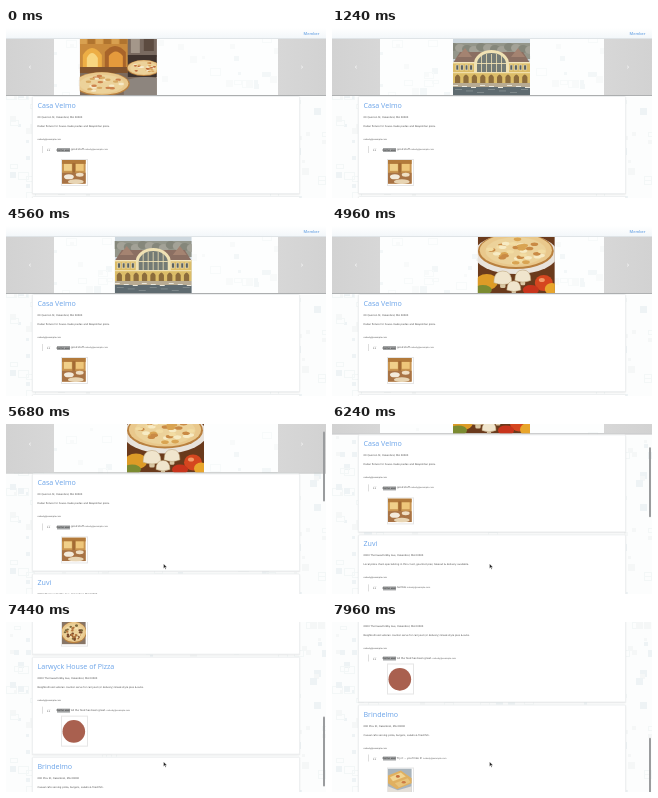
Write an HTML page with a canvas that moves like this. It is 320 px wide and 170 px high and loops after 8000 ms.

```html
<!DOCTYPE html>
<html lang="en">
<head>
<meta charset="utf-8">
<title>Pizza places</title>
<style>
html, body { margin: 0; width: 100%; height: 100%; overflow: hidden; background: #fcfdfd; }
#stage { position: relative; width: 320px; height: 170px; overflow: hidden; font-family: "DejaVu Sans", sans-serif; color: #444; }
#stage * { box-sizing: border-box; }
#backdrop, #page, #cursor, #bar { position: absolute; left: 0; top: 0; }
#page { width: 320px; height: 470px; }
header { position: absolute; width: 320px; height: 11px; background: linear-gradient(#fff, #f3f7fa); border-bottom: 1px solid #dfe4e7; }
header span { position: absolute; right: 6.5px; top: 2.5px; font: 600 3.9px/6px "Open Sans", sans-serif; color: #6ea6e4; }
#carousel { position: absolute; top: 11px; width: 320px; height: 57px; overflow: hidden; background: rgba(255,255,255,.3); border-bottom: 1.5px solid #aeb0b1; }
.slide { position: absolute; left: 121px; top: 0; width: 77px; height: 56px; }
.control { position: absolute; top: 0; width: 48px; height: 56px; background: linear-gradient(90deg, #d2d2d2, #d7d7d7); color: #fff; font: 8px/53px "Open Sans", sans-serif; text-align: center; }
.control.next { right: 0; background: linear-gradient(270deg, #d2d2d2, #d7d7d7); }
.card { position: absolute; left: 26px; width: 268px; height: 98px; background: #fff; border: .5px solid #eef0f1; border-radius: 1.5px; box-shadow: 0 .5px 1.5px rgba(0,0,0,.1); }
.card > * { position: absolute; margin: 0; white-space: nowrap; }
.card h2 { left: 4.5px; top: 3px; font: 500 7.1px/11px "Open Sans", sans-serif; color: #6aa3e8; }
.card p { left: 4.5px; font-size: 2.45px; line-height: 4px; }
.card .mail { font-size: 2.05px; }
.quote { left: 9px; top: 49px; height: 7px; border-left: 1px solid #ddd; padding-left: 13.5px; font-size: 2.5px; line-height: 6px; }
.quote::before { content: "“"; position: absolute; left: 3.5px; top: .5px; font: 9px/9px "Noto Serif", serif; color: #b5b5b5; }
.quote b { font-weight: 400; background: #a2a4a5; padding: .5px 0; color: #222; }
.quote small { font-size: 2.05px; color: #555; }
.thumb { left: 27.5px; top: 61.5px; width: 27px; height: 27px; padding: .7px; background: #fff; border: .5px solid #e6e6e6; }
.thumb.tall { top: 58px; height: 31px; }
.thumb svg { display: block; width: 100%; height: 100%; }
#bar { left: 317px; width: 2.4px; height: 70px; border-radius: 2px; background: #9a9c9e; }
</style>
</head>
<body>
<div id="stage">
  <canvas id="backdrop" width="320" height="170"></canvas>
  <div id="page">
    <header><span>Member</span></header>
    <div id="carousel">
      <svg class="slide" viewBox="0 0 77 56" id="oven"></svg>
      <svg class="slide" viewBox="0 0 77 56" id="boathouse"></svg>
      <svg class="slide" viewBox="0 0 77 56" id="mushroom"></svg>
      <div class="control">‹</div>
      <div class="control next">›</div>
    </div>
  </div>
  <div id="bar"></div>
  <svg id="cursor" width="5" height="7" viewBox="0 0 5 7"><path d="M.5 .3V5L1.6 4 2.4 5.8 3.2 5.4 2.4 3.8H4Z" fill="#222" stroke="#fff" stroke-width=".4"/></svg>
</div>
<script>
const $ = id => document.getElementById(id);
const LOOP = 8000;

const seeded = seed => () => (seed = (seed * 16807) % 2147483647) / 2147483647;
const rect = (x, y, w, h, fill, extra = '') => `<rect x="${x}" y="${y}" width="${w}" height="${h}" fill="${fill}" ${extra}/>`;
const oval = (x, y, rx, ry, fill) => `<ellipse cx="${x}" cy="${y}" rx="${rx}" ry="${ry}" fill="${fill}"/>`;
const path = (d, fill, extra = '') => `<path d="${d}" fill="${fill}" ${extra}/>`;
const repeat = (n, draw) => Array.from({ length: n }, (_, i) => draw(i)).join('');

function pizza(x, y, rx, ry, seed, colors, count = 24) {
  const rnd = seeded(seed);
  return oval(x, y, rx, ry, '#b9803f') + oval(x, y - ry * .04, rx * .95, ry * .93, '#e9c88c') +
    oval(x, y, rx * .8, ry * .77, '#ecd29a') +
    repeat(count, i => {
      const a = rnd() * 6.28, r = Math.sqrt(rnd()) * .72;
      return oval(x + Math.cos(a) * r * rx, y + Math.sin(a) * r * ry, rx * .1, ry * .1, colors[i % colors.length]);
    });
}

function ovenArt() {
  return rect(0, 0, 77, 56, '#7d6a5c') + rect(0, 0, 48, 32, '#c98a3c') +
    repeat(6, i => rect(i * 8, 0, 7, 5, i % 2 ? '#b0742f' : '#d8a050')) +
    path('M3 30V16Q12 2 22 16V30Z', '#edae45') + path('M7 30V19Q12 9 18 19V30Z', '#f8d680') +
    path('M25 30V13Q35 1 46 13V30Z', '#a8642a') + path('M29 30V17Q36 8 43 17V30Z', '#e59a3c') +
    rect(48, 0, 29, 18, '#796a60') + rect(51, 0, 9, 14, '#a4978a') + rect(64, 0, 10, 12, '#5c4b40') +
    rect(48, 16, 29, 22, '#40342f') + rect(0, 28, 48, 6, '#80532e') +
    pizza(64, 29, 17, 8, 12, ['#f8efd4', '#d8a35c', '#bf6a3c']) +
    path('M44 56V42Q60 36 77 39V56Z', '#8d857e') +
    pizza(22, 45, 28, 12, 7, ['#f6e9c8', '#d8aa64', '#cc814b']);
}

function boathouseArt() {
  const windows = (x, y, n, step) => repeat(n, i => rect(x + i * step, y, 2.6, 5, '#5d6360', 'stroke="#f5ead0" stroke-width=".5"'));
  return rect(0, 0, 77, 56, '#cdd7de') + rect(0, 4, 77, 16, '#94968a') +
    repeat(12, i => oval(i * 7, 8 + (i * 5) % 4, 5, 4, i % 2 ? '#a3a297' : '#85877b')) +
    path('M0 24L7 13H70L77 24Z', '#8b6f62') + path('M5 18L12 9 19 18ZM58 18L65 9 72 18Z', '#a48371') +
    rect(0, 23, 77, 21, '#dcbd68') + rect(0, 23, 77, 1.4, '#f4e7bd') + rect(0, 33, 77, 1.2, '#f1dfaa') +
    path('M21 34V25A17.5 14 0 0 1 56 25V34Z', '#f0e2b4') + path('M24 33V25A14.5 11 0 0 1 53 25V33Z', '#747b75') +
    repeat(5, i => rect(28 + i * 5, 15, .8, 18, '#f0e2b4')) + rect(24, 24, 29, .9, '#f0e2b4') +
    windows(3, 26, 4, 4.6) + windows(57, 26, 4, 4.6) +
    repeat(9, i => path(`M${2 + i * 8.4} 44V38Q${4.6 + i * 8.4} 33 ${7.2 + i * 8.4} 38V44Z`, '#8c6c3c')) +
    rect(0, 44, 77, 4, '#b8ab93') + rect(0, 48, 77, 8, '#5f6b70') +
    repeat(9, i => rect(i * 9, 46 + i % 3, 5, 1, '#ece8dc')) +
    repeat(7, i => rect(i * 11 + 2, 50 + (i % 3) * 1.6, 7, .7, '#8c9697'));
}

function mushroomArt() {
  const mushroom = (x, y, s) => rect(x - s * .3, y, s * .6, s * .9, '#d9c7a4', 'rx="1.5"') +
    path(`M${x - s} ${y + s * .3}Q${x - s} ${y - s} ${x} ${y - s}T${x + s} ${y + s * .3}Q${x} ${y + s * .7} ${x - s} ${y + s * .3}Z`, '#f0e5cd', 'stroke="#b79c70" stroke-width=".5"');
  return rect(0, 0, 77, 56, '#6a3a1c') + oval(38, 17, 42, 20, '#e8e3dc') +
    pizza(38, 14, 38, 18, 31, ['#f7ebc4', '#d9a452', '#c98a45', '#f2dca2'], 36) +
    oval(9, 45, 11, 8, '#dd9b27') + oval(5, 53, 9, 5, '#7b8b31') + oval(66, 46, 9, 8, '#d5461f') +
    oval(64, 43, 3, 2, '#f39a67') + oval(74, 52, 7, 6, '#e8a52b') + oval(53, 53, 8, 5, '#c8341c') +
    mushroom(25, 43, 9) + mushroom(45, 41, 8) + mushroom(36, 51, 7);
}

const wrap = art => `<svg viewBox="0 0 24 24">${art}</svg>`;
const thumbs = {
  room: rect(0, 0, 24, 24, '#c99550') + rect(0, 0, 24, 4, '#b27a3b') + rect(2, 4, 8, 7, '#f0d08a') +
    rect(14, 4, 8, 7, '#eec67a') + rect(10.5, 3, 3, 10, '#a36b34') + rect(0, 13, 24, 11, '#a87345') +
    oval(7, 17, 5, 2.6, '#f3eadb') + oval(18, 15, 4, 2, '#f0dfc4') + oval(14, 22, 8, 2.4, '#e8d5b4'),
  pie: rect(0, 0, 24, 24, '#877566') + pizza(12, 12, 13, 11, 5, ['#7a4a2c', '#f6e2b2', '#b4743d', '#7d6a3c'], 46),
  crest: rect(0, 0, 24, 24, '#fff') + oval(12, 12, 11.5, 11.5, '#a9604f'),
  slices: rect(0, 0, 24, 24, '#a9b4bc') + path('M0 7L13 2 24 10V15L9 21 0 15Z', '#e0b060') +
    path('M2 9L13 4 18 8 5 13Z', '#f1d594') + path('M7 15L20 10 23 14 11 19Z', '#e8c37a') +
    oval(10, 8, 2, 1.4, '#c6703c') + oval(16, 14, 2, 1.3, '#cb7a44') + path('M0 18L10 22 24 18V24H0Z', '#e4dfd8')
};

const places = [
  ['Casa Velmo', '00 Quorren St, Oakenbrel, MA 00000', 'Italian fixture for house-made pastas and Neapolitan pizza.', 'good stuff', 'room'],
  ['Zuvi', '0000 Thornwexfordby Ave, Oakenbrel, MA 00000', 'Local pizza chain specializing in thin-crust, gourmet pies; takeout & delivery available.', 'terrible', 'pie'],
  ['Larwyck House of Pizza', '0000 Thornwexfordby Ave, Oakenbrel, MA 00000', 'Neighborhood veteran counter serve for carryout (or delivery) Greek-style pies & subs.', 'All the food has been great.', 'crest'],
  ['Brindelmo', '000 Plov St, Oakenbrel, MA 00000', 'Casual cafe serving pizza, burgers, salads & fried fish.', "Try it ... you'll like it!", 'slices']
];

$('page').insertAdjacentHTML('beforeend', places.map(([name, address, about, comment, art], i) => `
  <section class="card" style="top:${68 + i * 100}px">
    <h2>${name}</h2>
    <p style="top:18.5px">${address}</p>
    <p style="top:27.8px">${about}</p>
    <p class="mail" style="top:40.3px">nobody@example.com</p>
    <div class="quote"><b>Demo user</b> ${comment} <small>nobody@example.com</small></div>
    <div class="thumb${art === 'crest' ? ' tall' : ''}">${wrap(thumbs[art])}</div>
  </section>`).join(''));

$('oven').innerHTML = ovenArt();
$('boathouse').innerHTML = boathouseArt();
$('mushroom').innerHTML = mushroomArt();

// Faint scattered blocks behind the page.
function paintBackdrop() {
  const ctx = $('backdrop').getContext('2d'), rnd = seeded(41);
  ctx.fillStyle = '#fcfdfd';
  ctx.fillRect(0, 0, 320, 170);
  for (let i = 0; i < 200; i++) {
    const x = Math.floor(rnd() * 80) * 4, y = Math.floor(rnd() * 43) * 4, size = 3 + Math.floor(rnd() * 5);
    ctx.fillStyle = ctx.strokeStyle = ['#f3f7f7', '#eef3f5', '#f5f7f7'][i % 3];
    if (i % 3) ctx.fillRect(x, y, size, size);
    else ctx.strokeRect(x + .5, y + .5, size + 3, size);
  }
}
paintBackdrop();

const clamp = v => Math.max(0, Math.min(1, v));

// cubic-bezier(.42, 0, .58, 1), solved by bisection
function easeInOut(x) {
  let lo = 0, hi = 1;
  for (let i = 0; i < 24; i++) {
    const s = (lo + hi) / 2, r = 1 - s;
    if (1.26 * r * r * s + 1.74 * r * s * s + s ** 3 < x) lo = s; else hi = s;
  }
  return lo * lo * (3 - 2 * lo);
}

// time, offset, speed in px per ms
const scrollSteps = [[5160, 0, 0], [5680, 18.5, .055], [6240, 57.5, .1], [6960, 166, .15], [7960, 285.5, .07]];
function scrollAt(t) {
  if (t <= scrollSteps[0][0]) return 0;
  const i = scrollSteps.findIndex(step => t < step[0]);
  if (i < 0) return scrollSteps.at(-1)[1];
  const [t0, y0, v0] = scrollSteps[i - 1], [t1, y1, v1] = scrollSteps[i];
  const d = t1 - t0, u = (t - t0) / d, u2 = u * u, u3 = u2 * u;
  return y0 * (2 * u3 - 3 * u2 + 1) + v0 * d * (u3 - 2 * u2 + u) + y1 * (3 * u2 - 2 * u3) + v1 * d * (u3 - u2);
}

const slides = ['oven', 'boathouse', 'mushroom'].map($);
function render(t) {
  const position = easeInOut(clamp((t + 159) / 600)) + easeInOut(clamp((t - 4478) / 600));
  slides.forEach((slide, i) => slide.style.transform = `translateX(${(i - position) * 320}px)`);
  const scroll = scrollAt(t);
  $('page').style.transform = `translateY(${-scroll}px)`;
  $('bar').style.transform = `translateY(${scroll * .405}px)`;
  $('bar').style.opacity = clamp((t - 5100) / 80);
  const enter = easeInOut(clamp((t - 4960) / 200));
  $('cursor').style.transform = `translate(157px, ${172 - enter * 32.5}px)`;
}

const start = performance.now();
function tick() {
  render((performance.now() - start) % LOOP);
  requestAnimationFrame(tick);
}
tick();
</script>
</body>
</html>
```
